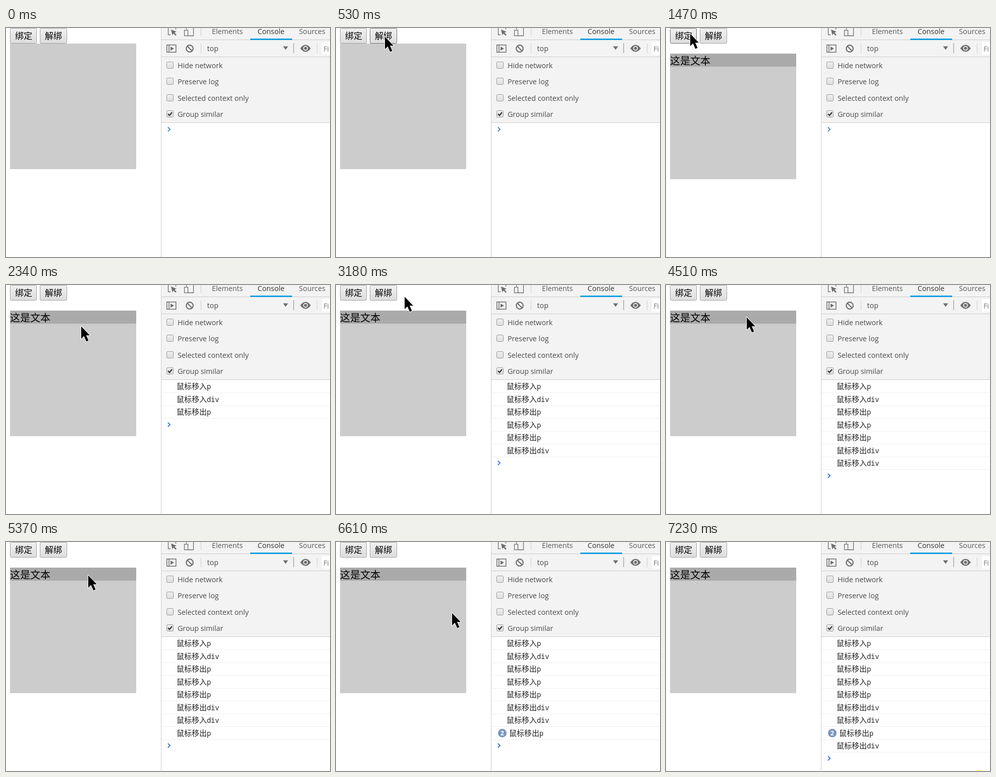
An HTML page with a canvas that plays this animation: 642x456 px, repeating every 7.31 s.

```html
<!DOCTYPE html>
<html lang="zh">
<head>
<meta charset="utf-8">
<title>Hover events console</title>
<style>
html, body { margin: 0; width: 100%; height: 100%; overflow: hidden; background: #fff; }
canvas { display: block; }
</style>
</head>
<body>
<canvas id="stage" width="642" height="456"></canvas>
<script>
const ctx = document.getElementById('stage').getContext('2d');
const LOOP = 7310;
const STEP = 77;
const ROW = 25.45;
const UI = '14.25px "Open Sans", sans-serif';
const CJK = '"Noto Sans CJK SC", "Noto Sans CJK", "Noto Sans CJK JP", sans-serif';
const MONO = '13.5px "Noto Sans Mono", monospace';
const GREY = '#6e6e6e';

const bind = { x: 8, w: 53, label: '绑定', down: 1310, up: 1465 };
const unbind = { x: 67, w: 54, label: '解绑', down: 3645, up: 3815 };
const outer = { name: 'div', x: 8, y: 51, w: 250, h: 250 };
const inner = { name: 'p', x: 8, y: 51, w: 250, h: 26 };

// Pointer positions, one per screen update
const trail = [{ time: -STEP, x: 770, y: 283 }];

function glide(start, steps, x, y, power = 1) {
  const from = trail[trail.length - 1];
  for (let k = 1; k <= steps; k++) {
    const u = (k / steps) ** power;
    trail.push({
      time: start + (k - 1) * STEP - 8,
      x: Math.round(from.x + (x - from.x) * u),
      y: Math.round(from.y + (y - from.y) * u)
    });
  }
}

glide(220, 5, 97, 17);
glide(605, 2, 54, 10);
glide(1000, 5, 48, 11);
glide(1700, 10, 160, 90);
glide(2480, 2, 160, 92);
glide(2790, 6, 136, 23);
glide(3252, 4, 108, 9);
glide(3580, 2, 107, 9);
glide(4130, 6, 160, 64);
glide(4592, 4, 161, 85);
glide(4900, 7, 163, 66);
glide(5750, 4, 164, 88);
glide(6610, 5, 700, 520, 1.3);

function inside(box, { x, y }) {
  return x >= box.x && x < box.x + box.w && y >= box.y && y < box.y + box.h;
}

// The page's listeners: unbinding drops only the enter handler of the paragraph
function recordEvents() {
  const events = [];
  const over = {};
  for (const point of trail.filter(p => p.time >= bind.up)) {
    for (const box of [inner, outer]) {
      const now = inside(box, point);
      const silent = now && box === inner && point.time >= unbind.up;
      if (now !== !!over[box.name] && !silent) {
        events.push({ time: point.time, label: '鼠标移' + (now ? '入' : '出'), name: box.name });
      }
      over[box.name] = now;
    }
  }
  return events;
}
const events = recordEvents();

// Equal messages in a row share one line with a counter
function consoleRows(t) {
  const rows = [];
  for (const { label, name } of events.filter(e => e.time <= t)) {
    const last = rows[rows.length - 1];
    if (last && last.label === label && last.name === name) last.count++;
    else rows.push({ label, name, count: 1 });
  }
  return rows;
}

function rect(x, y, w, h, color) {
  ctx.fillStyle = color;
  ctx.fillRect(x, y, w, h);
}

function text(str, x, y, font, color) {
  ctx.font = font;
  ctx.fillStyle = color;
  ctx.fillText(str, x, y);
}

function cjk(str, x, y, size, color) {
  text(str, x, y, `300 ${size}px ${CJK}`, color);
}

function trace(points, close) {
  ctx.beginPath();
  points.forEach(([x, y]) => ctx.lineTo(x, y));
  if (close) ctx.closePath();
}

function fillShape(points, color) {
  trace(points, true);
  ctx.fillStyle = color;
  ctx.fill();
}

function line(points, color, width) {
  trace(points);
  ctx.strokeStyle = color;
  ctx.lineWidth = width;
  ctx.stroke();
}

function disc(x, y, r, color) {
  ctx.beginPath();
  ctx.arc(x, y, r, 0, Math.PI * 2);
  ctx.fillStyle = color;
  ctx.fill();
}

function bevel(x, y, w, h, from, to, border) {
  const shade = ctx.createLinearGradient(0, y, 0, y + h);
  shade.addColorStop(0, from);
  shade.addColorStop(1, to);
  ctx.beginPath();
  ctx.roundRect(x + 0.5, y + 0.5, w - 1, h - 1, 2);
  ctx.fillStyle = shade;
  ctx.fill();
  ctx.strokeStyle = border;
  ctx.lineWidth = 1;
  ctx.stroke();
}

function drawButton({ x, w, label, down, up }, pointer, t) {
  const hover = inside({ x, y: 0, w, h: 31 }, pointer);
  const pressed = t >= down && t < up;
  const [from, to] = pressed ? ['#e2e2e2', '#d4d4d4'] : ['#f0f0f0', '#dddddd'];
  bevel(x, 0, w, 31, from, to, hover ? '#707070' : '#a0a0a0');
  cjk(label, x + 10, 22, 17, '#000');
}

function drawPage(t, pointer) {
  const shown = t >= bind.up;
  rect(outer.x, shown ? outer.y : 31, outer.w, outer.h, '#ccc');
  if (shown) {
    rect(inner.x, inner.y, inner.w, inner.h, '#aaa');
    cjk('这是文本', 8, 72.5, 20, '#000');
  }
  drawButton(bind, pointer, t);
  drawButton(unbind, pointer, t);
}

function drawTabs() {
  line([[321.5, 0], [321.5, 13.5], [326, 13.5]], GREY, 1.3);
  line([[336.5, 0], [336.5, 3]], GREY, 1.3);
  fillShape([[327, 3], [338, 7.5], [333.8, 9.2], [338, 13.5], [336, 15.3], [331.8, 11], [329.6, 14.5]], GREY);
  line([[357.5, 3], [357.5, 0]], GREY, 1.3);
  line([[371.5, 0], [371.5, 15.5], [361, 15.5]], GREY, 1.3);
  ctx.strokeRect(353.5, 4.5, 7, 11);
  rect(386, 0, 1, 16, '#ccc');
  text('Elements', 408, 12, UI, '#5a5a5a');
  text('Console', 498.5, 12, UI, '#333');
  text('Sources', 580.5, 12, UI, '#5a5a5a');
  rect(308, 23, 334, 1, '#ccc');
  rect(484, 21, 83, 3, '#15a0e0');
}

function drawToolbar() {
  ctx.strokeStyle = GREY;
  ctx.lineWidth = 1.5;
  ctx.strokeRect(318.75, 33.75, 18, 14.5);
  line([[323, 34], [323, 48]], GREY, 1.5);
  fillShape([[326, 37], [333, 41], [326, 45]], GREY);

  ctx.beginPath();
  ctx.arc(364, 41, 6.8, 0, Math.PI * 2);
  ctx.lineWidth = 2.2;
  ctx.stroke();
  line([[359.3, 36.3], [368.7, 45.7]], GREY, 2.2);

  rect(386, 31, 1, 19, '#ccc');
  text('top', 398.5, 46, UI, '#4a4a4a');
  fillShape([[549, 36.5], [559, 36.5], [554, 43.5]], GREY);
  rect(569, 30, 2, 20, '#bbb');

  ctx.beginPath();
  ctx.moveTo(583, 40.5);
  ctx.quadraticCurveTo(593.5, 26.5, 604, 40.5);
  ctx.quadraticCurveTo(593.5, 54.5, 583, 40.5);
  ctx.fillStyle = GREY;
  ctx.fill();
  disc(593.5, 40.5, 4.7, '#f3f3f3');
  disc(593.5, 40.5, 3, GREY);

  rect(616, 31, 1, 19, '#ccc');
  rect(626, 28, 16, 25, '#fff');
  text('Fi', 629, 46.5, UI, '#777');
  rect(308, 57, 334, 1, '#ccc');
}

function drawSettings() {
  ['Hide network', 'Preserve log', 'Selected context only', 'Group similar'].forEach((label, i) => {
    const y = Math.round(67 + 32.4 * i);
    bevel(318, y, 14, 14, '#f0f0f0', '#dedede', '#999');
    text(label, 340, y + 13, UI, '#4a4a4a');
  });
  line([[321, 171], [324, 174], [329, 168]], '#333', 2.4);
  rect(308, 188, 334, 1, '#ccc');
}

function drawConsole(t) {
  const rows = consoleRows(t);
  rows.forEach(({ label, name, count }, i) => {
    const y = Math.floor(207.9 + ROW * i);
    const x = count > 1 ? 343 : 338;
    if (count > 1) {
      disc(329.5, y - 5.5, 8.5, '#7b95bf');
      text(count, 325.8, y - 1, 'bold 12.5px "Open Sans", sans-serif', '#fff');
    }
    cjk(label, x, y, 15, '#222');
    text(name, x + 60, y, MONO, '#222');
    rect(308, Math.floor(189.5 + ROW * (i + 1)), 334, 1, '#f0f0f0');
  });
  const y = 201.7 + ROW * rows.length;
  line([[320.8, y - 4.2], [325, y], [320.8, y + 4.2]], rows.length ? '#367cf1' : '#438fc4', 2);
}

function drawPointer({ x, y }) {
  ctx.save();
  ctx.translate(x - 0.5, y);
  trace([[0.5, 0.5], [0.5, 25], [6, 19.8], [10.8, 30.5], [15, 28.6], [10.4, 18.3], [17.5, 18.3]], true);
  ctx.strokeStyle = '#fff';
  ctx.lineWidth = 1.8;
  ctx.stroke();
  ctx.fillStyle = '#000';
  ctx.fill();
  ctx.restore();
}

function draw(t) {
  const pointer = trail.filter(p => p.time <= t).pop();
  rect(0, 0, 642, 456, '#fff');
  drawPage(t, pointer);
  rect(308, 0, 334, 188, '#f3f3f3');
  rect(307, 0, 1, 456, '#ccc');
  drawTabs();
  drawToolbar();
  drawSettings();
  drawConsole(t);
  if (t >= 7225) disc(621, 467, 13.2, '#ffff80');
  drawPointer(pointer);
}

const begin = performance.now();
function frame() {
  draw((performance.now() - begin) % LOOP);
  requestAnimationFrame(frame);
}
frame();
</script>
</body>
</html>
```
